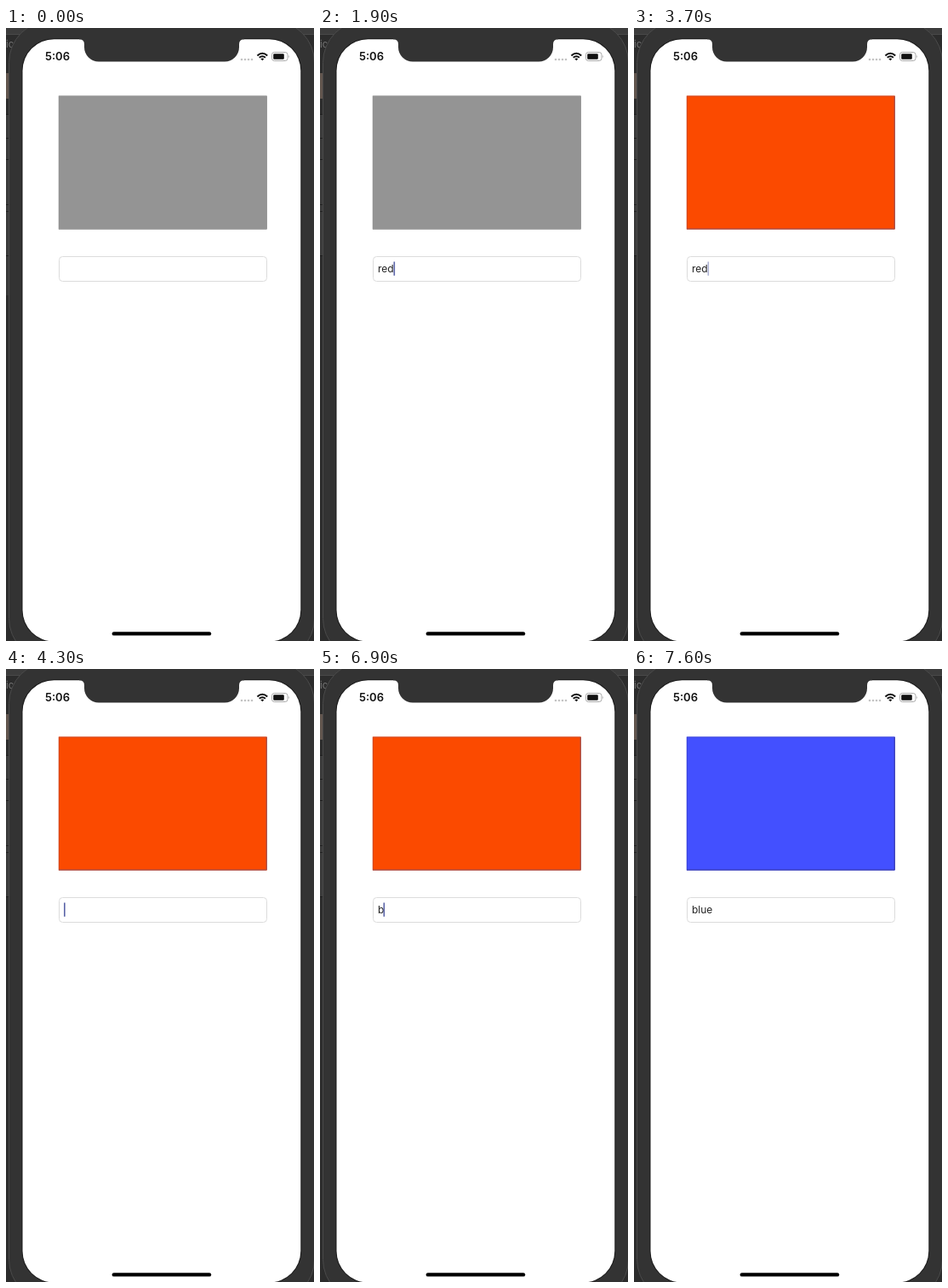
Animation of 362 by 720 pixels, one loop 8 s. Source, as an HTML page:

```html
<!DOCTYPE html>
<html lang="en">
<head>
<meta charset="utf-8">
<title>Colour field</title>
<style>
  html, body { margin: 0; width: 100%; height: 100%; overflow: hidden; background: #2b2b2b; }
  svg { display: block; }
  text { font-family: Inter, Roboto, sans-serif; }
</style>
</head>
<body>
<svg width="362" height="720" viewBox="0 0 362 720">
  <!-- desktop behind the phone -->
  <rect width="362" height="720" fill="#2c2c2c"/>
  <rect width="362" height="7" fill="#3c3c3c"/>
  <path d="M0 7.5H362" stroke="#494949"/>
  <text x="0" y="23" font-size="11" fill="#777">ic</text>
  <rect y="53" width="4" height="30" fill="#62564e"/>
  <rect y="102" width="4" height="165" fill="#3b3b3b"/>
  <rect id="strip" y="267" width="4" height="47" fill="#383838"/>
  <path d="M0 101.5H4M0 129.5H4M0 154.5H4M0 267.5H4" stroke="#1f1f1f"/>
  <rect x="-2.5" y="207.5" width="6" height="8" fill="none" stroke="#222"/>

  <!-- phone body, screen and notch -->
  <rect x="3.5" y="-8.5" width="359" height="751" rx="49" fill="#333" stroke="#4a4a4a"/>
  <rect x="19.5" y="13.2" width="326.8" height="707.3" rx="37" fill="#fff"
        stroke="#1b1b1b" stroke-width="2" paint-order="stroke"/>
  <path d="M86 12H280V13.2Q274 13.2 274 19V22.5A17 17 0 0 1 257 39.5H109A17 17 0 0 1 92 22.5V19Q92 13.2 86 13.2Z"
        fill="#333"/>

  <!-- status bar -->
  <text x="46" y="38.3" font-size="13" font-weight="600" fill="#111">5:06</text>
  <g fill="#c4c4c4">
    <circle cx="277" cy="37" r="1.3"/><circle cx="281" cy="37" r="1.3"/>
    <circle cx="285" cy="37" r="1.3"/><circle cx="289" cy="37" r="1.3"/>
  </g>
  <g fill="none" stroke="#111" stroke-width="2">
    <path d="M295.4 32.4Q301.3 27 307.2 32.4M297.7 34.8Q301.3 31.6 304.9 34.8"/>
    <path d="M301.3 38.3L299.3 36.2Q301.3 34.7 303.3 36.2Z" fill="#111" stroke="none"/>
  </g>
  <rect x="312.5" y="28.5" width="18.5" height="10" rx="2.8" fill="none" stroke="#aaa"/>
  <rect x="314.2" y="30.2" width="12.6" height="6.6" rx="1.3" fill="#111"/>
  <path d="M332.3 31.8Q334 33.5 332.3 35.2Z" fill="#aaa"/>

  <!-- colour panel and text field -->
  <rect id="panel" x="61.8" y="79.5" width="245" height="157"/>
  <g id="edge" fill="none">
    <path d="M62.3 236V80H306" opacity=".4"/>
    <path d="M62 236H306.2V80"/>
  </g>
  <rect x="62.5" y="268.5" width="244" height="29" rx="4" fill="#fff" stroke="#dcdcdc"/>
  <text id="word" x="68" y="287" font-size="12" fill="#222"></text>
  <rect id="caret" y="274.5" width="1.6" height="16.3" fill="#5a64a8"/>
  <rect x="124.6" y="709.2" width="116.6" height="4.4" rx="2.2" fill="#000"/>
</svg>
<script>
const LOOP = 8000;
const [strip, panel, edge, word, caret] =
  ['strip', 'panel', 'edge', 'word', 'caret'].map(id => document.getElementById(id));

// [start ms, text, caret opacity]
const typing = [
  [0, '', 0], [1100, '', 1], [1600, '', .5],
  [1700, 'r', 1], [1800, 're', 1], [1900, 'red', 1], [2100, 'red', 0],
  [3700, 'red', .5], [3800, 'red', 1], [4100, 're', 1], [4200, 'r', 1], [4300, '', 1],
  [5000, '', .5], [5100, '', 0], [5500, '', 1], [5800, 'g', 1], [6400, '', 1],
  [6900, 'b', 1], [7100, 'bl', 1], [7200, 'blu', 1], [7300, 'blue', 1], [7600, 'blue', 0]
];
// [start ms, fill, edge]
const colours = [
  [0, '#949494', '#949494'],
  [2100, '#fb4a00', '#8a4a5c'],
  [7600, '#4350ff', '#34349c']
];
const at = (list, t) => list.findLast(step => step[0] <= t);

function draw(now) {
  const t = now % LOOP;
  const [, text, opacity] = at(typing, t);
  const [, fill, line] = at(colours, t);
  panel.setAttribute('fill', fill);
  edge.setAttribute('stroke', line);
  strip.setAttribute('opacity', t < 300 ? 1 : 0);
  word.textContent = text;
  caret.setAttribute('x', 68 + (text ? Math.round(word.getComputedTextLength()) - .5 : 0));
  caret.setAttribute('opacity', opacity);
  requestAnimationFrame(draw);
}
requestAnimationFrame(draw);
</script>
</body>
</html>
```
